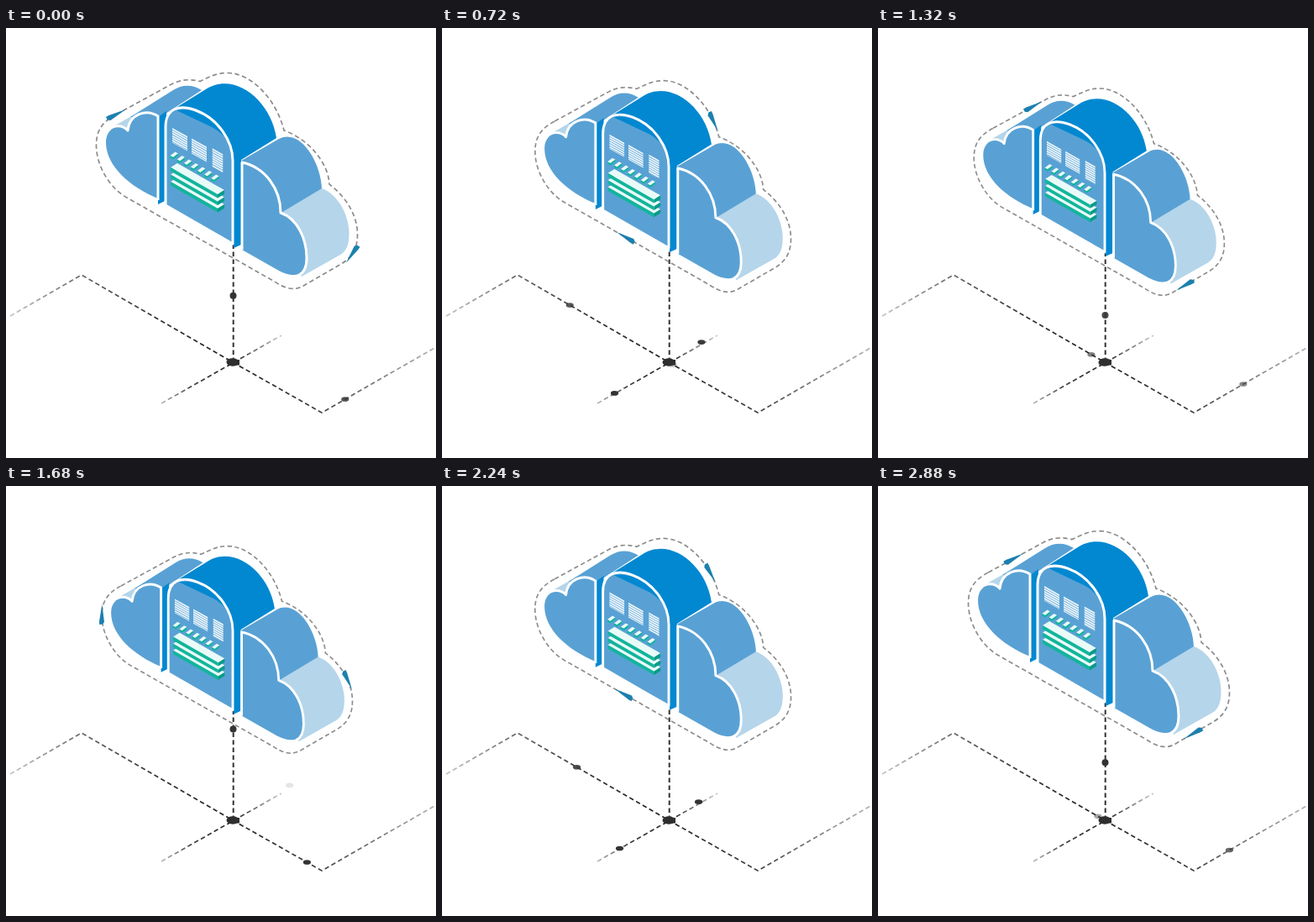
An HTML page without scripts for the animation above (2.92 s loop, 512 by 512 pixels).

```html
<!DOCTYPE html>
<html lang="en">
<head>
<meta charset="utf-8">
<title>Cloud network</title>
<style>
@property --t { syntax: "<number>"; inherits: true; initial-value: 0; }
html, body { margin: 0; width: 100%; height: 100%; overflow: hidden; background: #fff; }
svg { display: block; width: 100vw; height: 100vh; animation: clock 2920ms steps(73) infinite; }
@keyframes clock { from { --t: 0; } to { --t: 2920; } }

/* the cloud breathes towards the floor and back */
.cloud {
  --rim: path("M131 103C112 113 107.500 125 107.500 140C107.500 162 122 190 144 202L319 301.500C332 310 343 314 355 306.500L399 281C414 272 418.500 260 418.500 246C418.500 224 406 202 385 186C384 162 362 133 331 122C322 85 292 53.500 264 53.500C250 53.500 243 58 231 63.500C216 60 207 62 197 67Z");
  transform-origin: 270px 500px;
  transform: scale(calc(1 - .0213 * (1 - cos(var(--t) / 2950 * 360deg))));
}

/* --s: start of a pulse in ms, --p: its progress */
.pulse {
  --p: calc(mod(var(--t) - var(--s), 1475) / 1475);
  offset-rotate: 0deg;
  offset-distance: calc((1 - cos(var(--p) * 180deg)) * 50%);
  opacity: clamp(0, min(2.4 * var(--p) - .15, 3.2 * (1 - var(--p))), 1);
  fill: #333;
}
.up { --s: 682; offset-path: path("M270.5 398V256"); }
.east { --s: 867; offset-path: path("M480 398L376 458L270 398"); }
.west { --s: 130; offset-path: path("M90 294L270 398"); }
.south { --s: -6; offset-path: path("M144 470L270 398"); }
.north { --s: 35; offset-path: path("M340 355L270 398"); }

.rim { d: var(--rim); }
.comet {
  offset-path: var(--rim);
  offset-distance: calc(var(--t) / var(--lap) * 100% + var(--from));
}
.dash { fill: none; stroke-dasharray: 5.5 3.5; }
.line { fill: none; stroke: #fff; stroke-width: 3; stroke-linejoin: round; }
.mid { fill: #59a1d4; }
.deep { fill: #0288d1; }
.pale { fill: #b5d5ea; }
</style>
</head>
<body>
<svg viewBox="0 0 512 512">
  <defs>
    <linearGradient id="floor" gradientUnits="userSpaceOnUse" x1="5" y1="0" x2="511" y2="0">
      <stop offset="0" stop-color="#c4c4c4"/><stop offset=".17" stop-color="#666"/>
      <stop offset=".35" stop-color="#333"/><stop offset=".52" stop-color="#222"/>
      <stop offset=".73" stop-color="#444"/><stop offset="1" stop-color="#b4b4b4"/>
    </linearGradient>
    <linearGradient id="cross" gradientUnits="userSpaceOnUse" x1="185" y1="0" x2="328" y2="0">
      <stop offset="0" stop-color="#bbb"/><stop offset=".25" stop-color="#444"/>
      <stop offset=".6" stop-color="#222"/><stop offset="1" stop-color="#ccc"/>
    </linearGradient>
    <clipPath id="stage"><path d="M0 0H512V463.500H0Z"/></clipPath>
    <ellipse id="dot" rx="4.6" ry="2.8"/>
    <g id="slab">
      <path fill="#e9fbf8" d="M196 166L204 161L260 193L252 198Z"/>
      <path fill="#12b59b" d="M196 166L252 198V202.500L196 170.500Z"/>
      <path fill="#089c86" d="M252 198L260 193V197.500L252 202.500Z"/>
    </g>
    <g id="key">
      <path fill="#e9fbf8" d="M195.500 152L201.500 147.500L205 149.500L199 154Z"/>
      <path fill="#12b59b" d="M195.500 152L199 154L205 149.500V152L199 156.500L195.500 154.500Z"/>
    </g>
    <g id="keys">
      <use href="#key"/><use href="#key" x="8.100" y="4.500"/>
    </g>
    <path id="comet" fill="#1c80ae" d="M-13 0L9 -3.200L12 -1V3L8 3Z"/>
  </defs>

  <g class="dash" stroke-width="1.7">
    <path stroke="url(#floor)" d="M5 343L90 294L270 398L376 458L511 380.500"/>
    <path stroke="url(#cross)" d="M185 447L328 366"/>
    <path stroke="#333" stroke-width="2" d="M270.700 398V256"/>
  </g>
  <ellipse cx="270" cy="398" rx="7.500" ry="4.700" fill="#2e2e2e"/>
  <path fill="#2e2e2e" d="M273 395H278V401.500H273Z"/>

  <g class="cloud">
    <path class="rim dash" stroke="#8c8c8c" stroke-width="1.7"/>
    <use class="comet" href="#comet" style="--from:0%;--lap:3000"/>
    <use class="comet" href="#comet" style="--from:50%;--lap:3040"/>

    <!-- left part -->
    <path class="pale" d="M121 121L160 99L172 104L146 122Z"/>
    <path class="mid" d="M148 106L199 74C210 67 222 67 233 74L190 102L181 108Z"/>
    <path class="deep" d="M181 106L191 99V205L181 210Z"/>
    <path class="mid" d="M181 203C147 189 119 164 119 136C119 119 135 112 145 122C147 102 167 96 181 105Z"/>
    <path class="line" d="M121 122C128 115 139 115 145 122C147 102 167 96 181 105V205"/>

    <!-- middle part -->
    <path class="deep" d="M199 97L241 71C275 53 316 88 322 131L280 157V258L271 262V160Z"/>
    <path class="mid" d="M190 211V118C190 95 207 91 226 98C253 108 270 135 270 158V257Z"/>
    <path class="deep" d="M203 98L245 118C251 121 256 125 260 130C250 108 224 94 203 98Z"/>
    <path class="line" d="M190 211V118C190 95 207 91 226 98C253 108 270 135 270 158V257Z"/>

    <!-- door panel -->
    <g fill="none" stroke="#eef6fb" stroke-width="18" stroke-dasharray="2 .8">
      <path transform="matrix(1 .56 0 1 0 -110.900)" d="M207 119V136.500"/>
      <path transform="matrix(1 .56 0 1 0 -123.800)" d="M230 131.500V149.500"/>
      <path transform="matrix(1 .56 0 1 0 -137.800)" stroke-width="12.500" d="M252 143.500V166"/>
    </g>
    <use href="#keys"/><use href="#keys" x="16.200" y="9"/><use href="#keys" x="32.400" y="18"/>
    <use href="#key" x="48.600" y="27"/>
    <use href="#slab" y="17"/><use href="#slab" y="8.500"/><use href="#slab"/>

    <!-- right part -->
    <path class="mid" d="M280 158L325 132C350 119 375 159 376 192L328 221Z"/>
    <path class="pale" d="M326 221L376 191C396 198 408.500 224 408.500 245C408.500 258 405 266 398 270L352 296Z"/>
    <path class="mid" d="M281 160C309 166 327 192 327 220C347 227 358 251 358 274C358 294 344 299 325 289L281 264Z"/>
    <path class="line" d="M281 264V160C309 166 327 192 327 220C347 227 358 251 358 274C358 284 355 291 349 294"/>
  </g>

  <g clip-path="url(#stage)">
    <use class="pulse east" href="#dot"/>
    <use class="pulse west" href="#dot"/>
    <use class="pulse south" href="#dot"/>
    <use class="pulse north" href="#dot"/>
    <circle class="pulse up" r="4"/>
  </g>
</svg>
</body>
</html>
```
